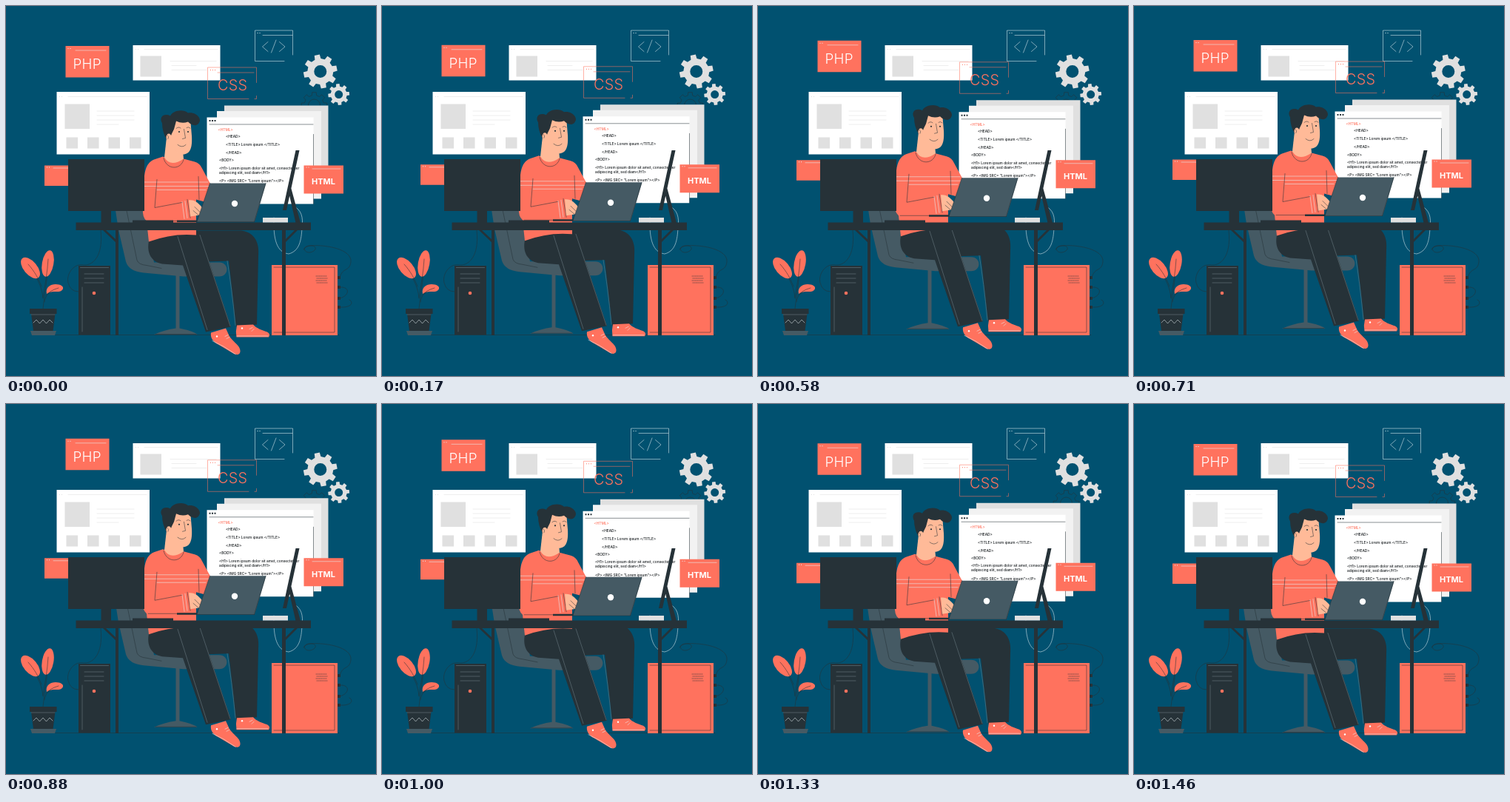
Recreate the animation shown at these times as an HTML page. Size 500 px wide and 500 px high, loop 1500 ms.

```html
<!DOCTYPE html>
<html lang="en">
<head>
<meta charset="utf-8">
<style>
  html, body { margin: 0; width: 100%; height: 100%; overflow: hidden; background: #015170; }
  svg { display: block; width: 100vw; height: 100vh; }
  text { font-family: Inter, "Open Sans", sans-serif; white-space: pre; }
  .red { fill: #ff725e; } .dark { fill: #263238; } .grey { fill: #455a64; }
  .pale { fill: #e0e0e0; } .white { fill: #fff; } .skin { fill: #ffba98; }
  .line { fill: none; stroke: #263238; stroke-width: .55; stroke-linecap: round; stroke-linejoin: round; }
  .light { stroke: #e6eef2; } .soft { stroke: #e0e0e0; } .coral { stroke: #ff725e; } .muted { stroke: #6f7f87; }
  .dots { stroke-dasharray: 1 2; stroke-width: 1; stroke-linecap: butt; }
  .code { font-size: 4.8px; font-weight: 500; fill: #14191c; }
</style>
</head>
<body>
<svg viewBox="0 0 500 500">
  <path class="line" d="M66 444.500H450"/>

  <!-- fixed windows -->
  <path class="white" d="M171.500 53H289.500V100.500H171.500ZM68.500 116H194V200.500H68.500Z"/>
  <path class="pale" d="M181.500 67.500H210V95.500H181.500ZM79.500 132.500H113V166H79.500ZM81.500 177.500h15.500v15h-15.500zm28.500 0h15.500v15h-15.500zm28.500 0h15.500v15h-15.500zm28.500 0h15.500v15h-15.500z"/>
  <path class="line soft" d="M187 58.500H286M222 74.500H284M224 80.500H257M224 86.500H271M84 122.500H190M123 142H173M123 148H173M123 154H173M123 160H152"/>
  <path class="line soft dots" d="M175 58.500h6M72 122.500h6"/>
  <path class="line light" d="M387.500 66V33H336.500V74.500H376M347 39.500H387M354 48.500L346.500 55L354 61.500M369.500 48.500L377 55L369.500 61.500M365 46L358.500 63"/>
  <path class="line light dots" d="M339.500 36.500h6"/>
  <path class="line" data-gear="416.500 134 17.500 13.500 8 0"/>
  <path class="pale" fill-rule="evenodd" data-gear="424.800 88.600 23 17.500 8.500 -.2"/>
  <path class="pale" fill-rule="evenodd" data-gear="449.700 119.600 14.500 11 5.500 -.1"/>

  <!-- floating windows -->
  <g class="bob">
    <path class="red" d="M80.500 54.500H139.500V97H80.500ZM52 216H100V243.500H52Z"/>
    <path class="line light" d="M94 60.500H135M64 219.500H84"/>
    <path class="line light dots" d="M83.500 58h6M55 218.500h6"/>
    <text class="white" x="90.500" y="85.800" font-size="18.800" font-weight="300" letter-spacing=".3">PHP</text>

    <path class="line coral" d="M338.500 104V83.500H272.500V126H328M336 126H338.500V122M286 90.500H335"/>
    <path class="line coral dots" d="M276 87h7"/>
    <text class="red" x="286" y="114.800" font-size="19.800" font-weight="300" letter-spacing=".3">CSS</text>

    <path class="pale" d="M295 135H435.500V253H295Z"/>
    <path fill="#f2f2f2" d="M285 142.500H426V261H285Z"/>
    <path class="white" d="M271.500 151H415.500V268H271.500Z"/>
    <path class="line" d="M415.500 174V268M275 160.500H415"/>
    <path class="dark" d="M274.500 154.500h2v2h-2zm3.500 0h2v2h-2zm3.500 0h2v2h-2z"/>
    <g class="code">
      <text class="red" x="286.500" y="169.500">&lt;HTML&gt;</text>
      <text x="297" y="178.800">&lt;HEAD&gt;</text>
      <text x="297" y="189.800">&lt;TITLE&gt; Lorem ipsum &lt;/TITLE&gt;</text>
      <text x="297" y="200.800">&lt;/HEAD&gt;</text>
      <text x="288" y="211">&lt;BODY&gt;</text>
      <text x="288" y="221.500">&lt;H1&gt; Lorem ipsum dolor sit amet, consectetuer</text>
      <text x="288" y="227.500">adipiscing elit, sed diam&lt;/H1&gt;</text>
      <text x="288" y="238.800">&lt;P&gt; &lt;IMG SRC= "Lorem ipsum"&gt;&lt;/P&gt;</text>
    </g>

    <path class="red" d="M402.500 216H456V254H402.500Z"/>
    <path class="line light" d="M414 220.500H452"/>
    <path class="line light dots" d="M405.500 218.500h6"/>
    <text class="white" x="413" y="241.700" font-size="11" font-weight="700">HTML</text>
  </g>

  <!-- plant -->
  <path class="line" d="M50 409C52 390 56 370 57 345M50 395C49 378 40 365 31 350M52 400C53 390 60 385 72 381"/>
  <ellipse class="red" cx="56.500" cy="348" rx="7.800" ry="18" transform="rotate(10 56.500 348)"/>
  <ellipse class="red" cx="33" cy="354" rx="9" ry="17" transform="rotate(-40 33 354)"/>
  <path class="red" d="M55 389C53 380 60 376 67 376C74 376 78 379 77 382C75 387 69 386 64 386Q59 386 55 389Z"/>
  <path class="line" d="M50 394C53 375 56 360 57 342M48 379C44 368 38 358 30 349M54 391Q60 384 71 381"/>
  <path class="dark" d="M32 409H68.500V416H66.500L63.500 439H37L34 416H32Z"/>
  <path class="line muted" d="M34 417H66"/>
  <path class="line light" d="M37 428l4-4 4.500 5 4.500-5 4.500 5 4.500-5 4 4"/>
  <path class="grey" d="M33 439H68L66 445H35Z"/>

  <!-- computers below the desk -->
  <path class="line" d="M128 303C132 340 116 351 105 350C92 347 81 362 84 374Q87 386 98 386"/>
  <path class="dark" d="M98 351H141V444.500H98Z"/>
  <path class="line muted" d="M100.500 353.500H138.500M106 362H132M106 368H132M106 374H132M103 380V440"/>
  <circle class="red" cx="119" cy="388" r="2.300"/>
  <path class="line" d="M402 329C408 320 424 324 416 331C405 338 397 325 410 324C430 322 468 328 466 346C464 360 455 352 451 367M451 380C466 379 464 392 451 395M451 407C468 408 470 400 464 397"/>
  <path class="line light" d="M388 270C399 275 402 285 400 300C399 316 397 331 382 335C366 333 361 316 362 286"/>
  <path class="red" d="M359 350H448V445H359Z"/>
  <path class="line" d="M362 353H444V441H362"/>
  <path class="line" stroke-dasharray="1 1.200" d="M419 365h14M420 368h14M419 371h14M420 374h14"/>
  <path class="dark" d="M448 365h4v4h-4zm0 13h4v4h-4zm0 15h4v4h-4zm0 12h4v4h-4z"/>

  <!-- chair, person and laptop -->
  <g class="bob">
    <path class="grey" d="M148 277H188L200 347H288C302 347 302 366 288 366H240L186 361Q166 359 162 346L152 303Z"/>
    <path class="grey" d="M229.500 364H234.500V436Q254 440 258.500 444.500H200Q214 438 229.500 436Z"/>
    <path class="line" d="M163 277L177 344Q179 350 190 351L210 355M202 444H257"/>

    <path class="dark" d="M193 304H318C334 306 343 318 341 338L339 431L311 434L301 345L270 346Z"/>
    <path class="red" d="M277 442L297 436L302 447C306 453 315 459 316 464C318 470 314 473.500 308 470.500L287 458C279 454 276 448 277 442Z"/>
    <path class="red" d="M312 432L334 431C338 436 347 439 353 441Q358 444 355 448H311.500Q310 440 312 432Z"/>
    <path class="line light" d="M279 453Q295 460 310 471M312 446.500H354M296 447l4-2M298 450l4-2M329 437l4-2M332 440l3-3"/>
    <circle class="white" cx="285" cy="447" r="1.200"/><circle class="white" cx="319" cy="436" r="1.200"/>
    <path class="dark" d="M193 308H262L304 434L270 441L239 351L211 349C196 346 190 334 193 318Z"/>
    <path class="line muted" d="M232 312L272 438M262 310L303 433M299 345Q305 380 310 432"/>

    <path class="red" d="M212 204Q226 211 240 207L255 211Q262 213 265 220L279 246L268 265L257 262V310Q225 307 193 319L190 291Q184 286 185 274L187 230Q189 212 200 208Z"/>
    <path class="skin" d="M217 178L214 205Q222 219 240 207L239 196Z"/>
    <path class="line" d="M213 206C217 223 237 222 240 208"/>
    <path class="line light" stroke-width="1" d="M187 238.500H273M187 244H276M204 249H270"/>
    <path class="line" d="M204 235L201 273L238 266M192 291H248M245 262L249 287M260 231L261 262"/>
    <path class="line light" d="M238 265L241 288M242 264L245 287"/>
    <path class="skin" d="M247 263C255 262 260 267 265 273Q267 280 262 283L249 285Z"/>
    <path class="line" d="M255 272L263 280M253 277L260 283"/>

    <path class="skin" d="M222 152H249L251 176C252 192 249 201 239 201Q230 200 225 190L217 184Z"/>
    <path class="dark" d="M211 159C206 150 214 145 222 149C225 142 239 139 246 145C257 143 265 153 261 158C258 164 251 162 246 157Q238 160 230 156L227 167L224 173L221 181H217Q211 170 211 159Z"/>
    <ellipse class="skin" cx="220" cy="178" rx="3.500" ry="5"/>
    <path class="line" d="M230 166Q233 163 236 165.500M244 165Q246 163 249 165.500M240.500 167L242.500 179L238.500 180M232 188Q238 193 243 188M218 175Q221 177 219 180"/>
    <circle class="dark" cx="234" cy="170.500" r="1.100"/><circle class="dark" cx="246" cy="170.500" r="1.100"/>

    <path class="dark" d="M231 290H336V292.500H231Z"/>
    <path class="grey" d="M275.500 240H351.500L336 292H258Z"/>
    <path class="line" d="M275.500 240L258 292M351 240L335.500 292"/>
    <circle class="white" cx="309" cy="267.500" r="4.200"/>
  </g>

  <!-- desk -->
  <path class="dark" d="M84 207H187V277H84ZM128.500 277H142V293H128.500ZM171 289.500H226V293H171ZM94.500 292.500H412V303H94.500ZM148 303H152V445H148ZM373 303H378V445H373Z"/>
  <path class="dark" d="M391.500 195H396.500L379 276H374ZM381 247L385 245L398 293H391.500Z"/>
  <path class="dark" d="M131 303H135L150 317V321ZM394 303H390L376 317V321Z"/>
  <path class="pale" d="M347 286H381V292.500H347Z"/>
</svg>
<script>
  const PERIOD = 1500, LIFT = 8, LEAD = 20, REST = -.5;

  function gearPath(x, y, outer, inner, hole, turn) {
    const teeth = 8, step = Math.PI * 2 / teeth;
    const points = [];
    for (let i = 0; i < teeth; i++) {
      for (const [offset, radius] of [[-.3, inner], [-.2, outer], [.2, outer], [.3, inner]]) {
        const angle = turn + (i + offset) * step;
        points.push([x + radius * Math.cos(angle), y + radius * Math.sin(angle)]);
      }
    }
    const arc = `a${hole} ${hole} 0 1 0 `;
    return `M${points.join("L")}ZM${x - hole} ${y}${arc}${2 * hole} 0${arc}${-2 * hole} 0Z`;
  }

  for (const gear of document.querySelectorAll("[data-gear]")) {
    gear.setAttribute("d", gearPath(...gear.dataset.gear.split(" ").map(Number)));
  }

  const floating = document.querySelectorAll(".bob");

  function draw() {
    const phase = (performance.now() + LEAD) / PERIOD * Math.PI * 2;
    const y = REST - LIFT / 2 * (1 - Math.cos(phase));
    for (const group of floating) group.setAttribute("transform", `translate(0 ${y})`);
    requestAnimationFrame(draw);
  }
  draw();
</script>
</body>
</html>
```
